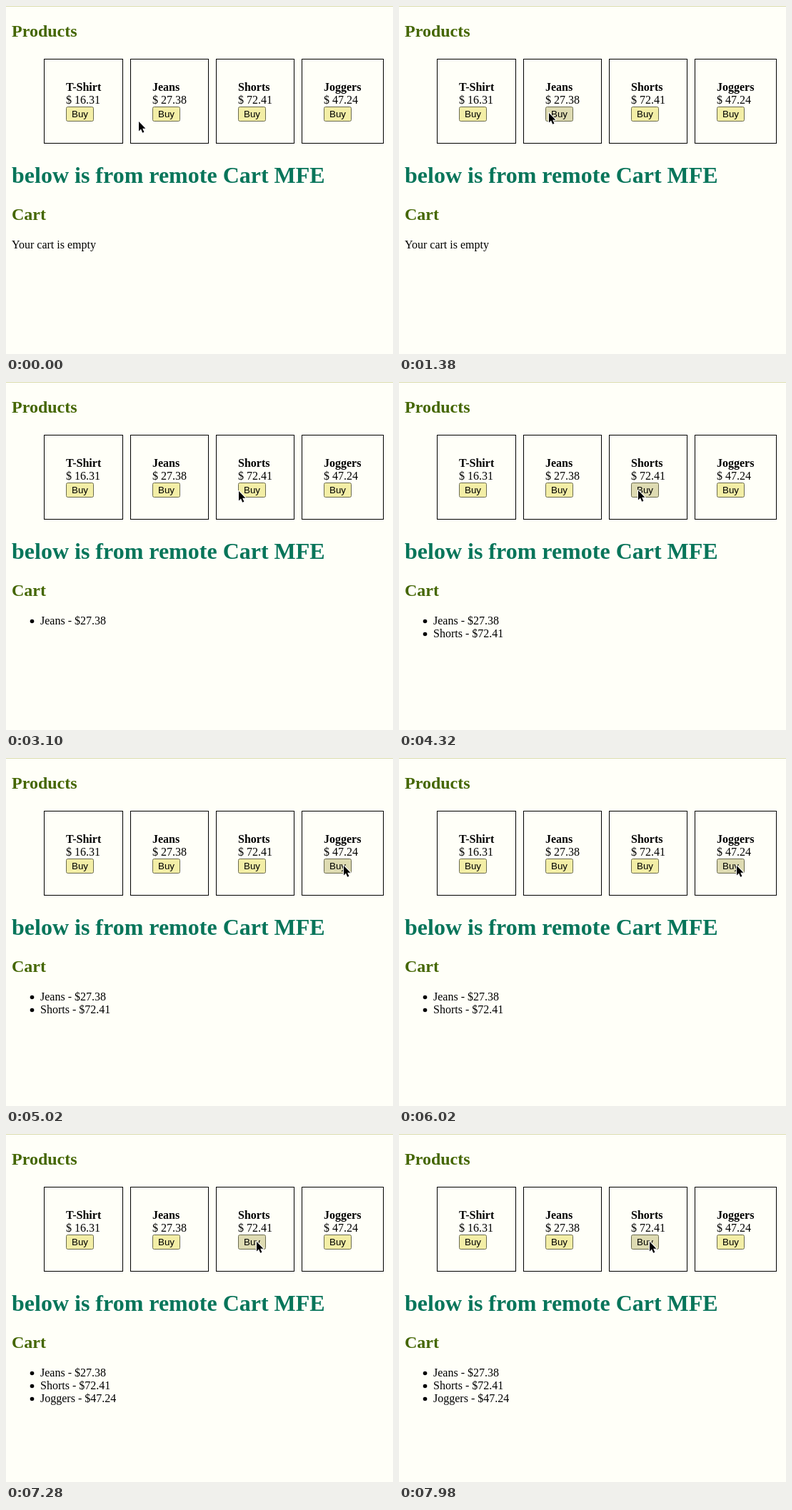
Animation, 542 px wide and 488 px high, one loop 8000 ms. Source, as an HTML page:

```html
<!DOCTYPE html>
<html lang="en">
<head>
<meta charset="utf-8">
<title>Products and cart</title>
<style>
  html, body { margin: 0; width: 100%; height: 100%; overflow: hidden; background: #fffff8; }
  svg { display: block; width: 542px; height: 488px; }
  text { font: 16px "Liberation Serif", "Times New Roman", serif; fill: #000; }
  .name { font-weight: bold; }
  .h1 { font-size: 32px; font-weight: bold; fill: #08755a; }
  .h2 { font-size: 24px; font-weight: bold; fill: #446600; }
  .card { fill: none; stroke: #000; }
  .buy { fill: #f3eea6; stroke: #6c6c50; }
  .buy.hover { fill: #dedbb2; }
  .label { font: 13.333px "Liberation Sans", Arial, sans-serif; }
</style>
</head>
<body>
<svg id="stage" viewBox="0 0 542 488"></svg>
<script>
const LOOP = 8000;
const stage = document.getElementById('stage');

const products = [
  { name: 'T-Shirt', price: '16.31', x: 84, width: 111 },
  { name: 'Jeans', price: '27.38', x: 205, width: 110, added: 1960 },
  { name: 'Shorts', price: '72.41', x: 325, width: 110, added: 4220 },
  { name: 'Joggers', price: '47.24', x: 445, width: 115, added: 6060 }
];

// Pointer tip: time, x, y
const path = [
  [0, 186, 162], [250, 186, 162], [800, 208, 152], [1380, 210, 150],
  [2460, 210, 150], [3100, 326, 153], [3340, 335, 152], [4340, 335, 152],
  [4960, 473, 151], [6160, 473, 151], [6700, 392, 149], [7300, 351, 151],
  [LOOP, 351, 151]
];

function add(tag, attrs, parent = stage) {
  const node = document.createElementNS('http://www.w3.org/2000/svg', tag);
  for (const key in attrs) node.setAttribute(key, attrs[key]);
  parent.append(node);
  return node;
}

function write(x, y, content, cls = '', parent = stage) {
  const node = add('text', { x, y, class: cls }, parent);
  node.textContent = content;
  return node;
}

add('rect', { width: 542, height: 1, fill: '#dadcae' });
write(8, 43, 'Products', 'h2');
write(8, 248, 'below is from remote Cart MFE', 'h1');
write(8, 300, 'Cart', 'h2');
const empty = write(8, 340, 'Your cart is empty');

let row = 0;
for (const item of products) {
  const { name, price, x, width } = item;
  add('rect', { x: x - 30.5, y: 74.5, width: width - 1, height: 118, class: 'card' });
  write(x, 119, name, 'name');
  write(x, 137, '$ ' + price);
  item.button = add('rect', { x: x + .5, y: 141.5, width: 38, height: 20, rx: 2, class: 'buy' });
  write(x + 8, 156, 'Buy', 'label');
  if (item.added) {
    const y = 340 + 18 * row++;
    item.line = add('g', {});
    add('circle', { cx: 36.5, cy: y - 4.5, r: 2.8 }, item.line);
    write(48, y, `${name} - $${price}`, '', item.line);
  }
}

const pointer = add('path', {
  d: 'M0 0V13.4L3 10.6L5.2 15.7L7.4 14.8L5.2 9.8H9.4Z',
  stroke: '#fff', 'stroke-width': 2, 'stroke-linejoin': 'round', 'paint-order': 'stroke'
});

function pointerAt(time) {
  const i = path.findIndex(step => step[0] > time);
  const [t0, x0, y0] = path[i - 1], [t1, x1, y1] = path[i];
  const p = (time - t0) / (t1 - t0);
  const eased = p * p * (3 - 2 * p);
  return [x0 + (x1 - x0) * eased, y0 + (y1 - y0) * eased];
}

const show = (node, on) => node.setAttribute('visibility', on ? 'visible' : 'hidden');

function draw(now) {
  const time = Math.max(0, now) % LOOP;
  const [x, y] = pointerAt(time).map(Math.round);
  pointer.setAttribute('transform', `translate(${x} ${y})`);
  show(empty, time < products[1].added);
  for (const item of products) {
    const over = x > item.x + 1 && x < item.x + 39 && y > 140 && y < 162;
    item.button.classList.toggle('hover', over);
    if (item.line) show(item.line, time >= item.added);
  }
  requestAnimationFrame(draw);
}
draw(0);
</script>
</body>
</html>
```
